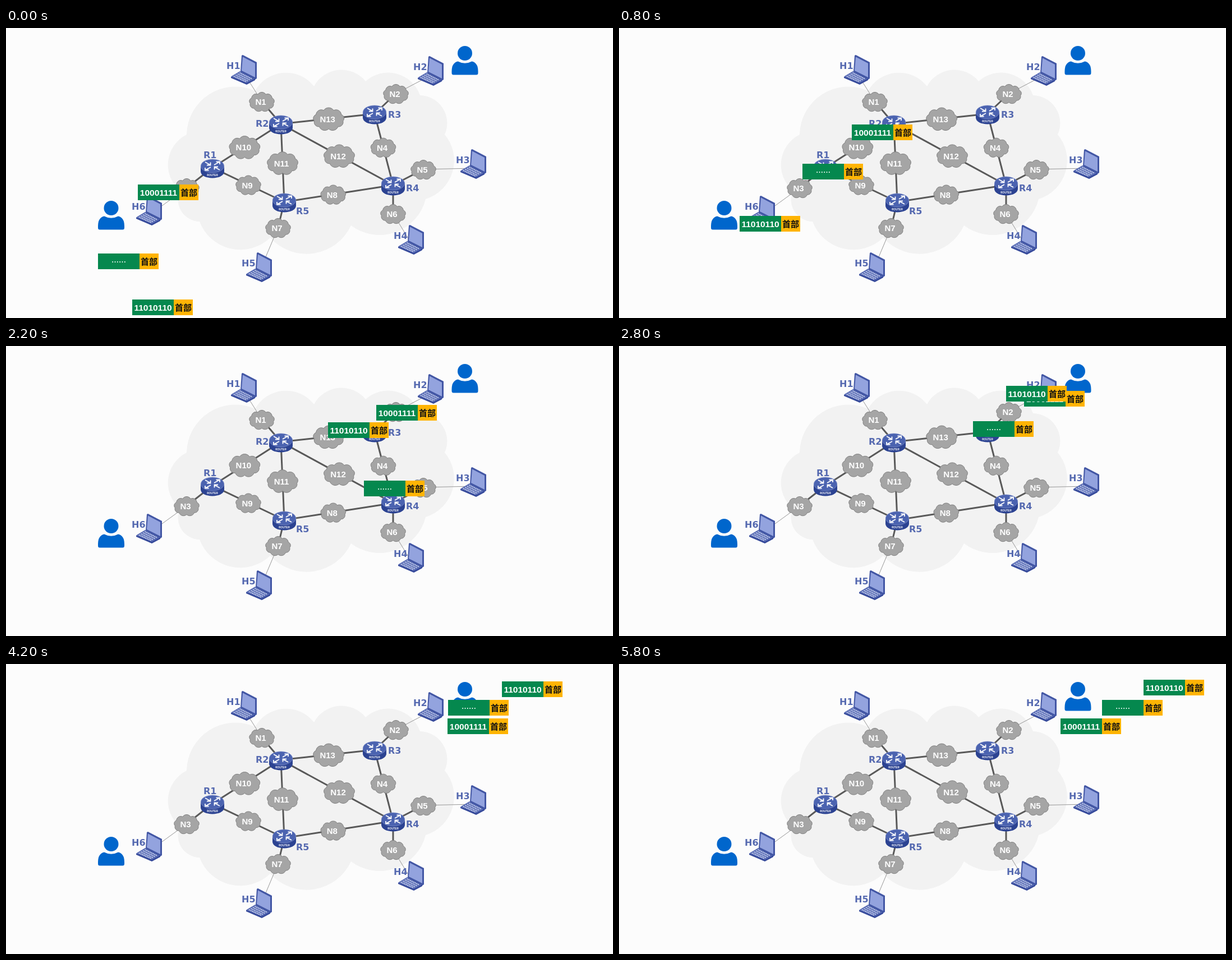
These frames come from a looping animation (1082 by 517 pixels, 6000 ms). An HTML page:

```html
<!DOCTYPE html>
<html lang="zh-CN">
<head>
<meta charset="utf-8">
<style>
html, body { margin: 0; width: 100%; height: 100%; overflow: hidden; background: #fcfcfc; }
svg { display: block; width: 1082px; height: 517px; }
.label { font: bold 16px "DejaVu Sans", sans-serif; fill: #5569b0; }
.net, .bits, .head, .tag { fill: #fff; text-anchor: middle; }
.net { font: bold 15px "Liberation Sans", sans-serif; }
.bits { font: bold 15.5px "Liberation Sans", "Noto Sans CJK SC", sans-serif; }
.dots { font: bold 13px "Noto Sans CJK SC", "Noto Sans CJK", sans-serif; }
.head { font: bold 15px "Noto Sans CJK SC", "Noto Sans CJK", sans-serif; fill: #111; }
.tag { font: bold 4.6px "Liberation Sans", sans-serif; }
</style>
</head>
<body>
<svg id="stage" viewBox="0 0 1082 517">
  <defs>
    <g id="person" fill="#0066cc">
      <circle cx="23.5" cy="13" r="13"/>
      <path d="M0 45Q0 30 11 27.500Q23.500 34 36 27.500Q47 30 47 45V48Q47 51.500 44 51.500H3Q0 51.500 0 48Z"/>
    </g>
    <g id="laptop" stroke-linejoin="round">
      <path d="M0 39V41L28 53L43 45V42Z" fill="#35499a"/>
      <path d="M16 29L43 42L28 50L0 38.500Z" fill="#5a6db5"/>
      <path d="M15.500 32L37 42.500M12 34L33.500 44.500M8.500 36L30 46.500M5 38L27 48" stroke="#dfe5f8" stroke-width="1.700" stroke-dasharray="1.900 1.200"/>
      <path d="M19 1L21 0L46 13V42L43 44L17 30Z" fill="#4256a4"/>
      <path d="M21 3.500L43 15V40L19 28Z" fill="#93a3de"/>
    </g>
    <g id="router">
      <path d="M-21-4V6A21 11.500 0 0 0 21 6V-4Z" fill="#2c4392"/>
      <ellipse cy="-4" rx="20.700" ry="12" fill="#4b63b0" stroke="#8494cc" stroke-width=".7"/>
      <g fill="none" stroke="#fff" stroke-width="1.800">
        <path id="arrows" d="M3-6L12-11M6.500-11.500H13V-7M-13-11L-4-6M-3.500-10.500V-5.500H-10"/>
        <use href="#arrows" transform="rotate(180 0 -4)"/>
      </g>
      <text class="tag" y="14">ROUTER</text>
    </g>
  </defs>
</svg>
<script>
const stage = document.getElementById("stage");

// x, y, then the label's offset
const routers = {
  R1: [368, 250, -16, -18], R2: [490, 172, -45, 4], R3: [657, 154, 24, 6],
  R4: [690, 281, 23, 10], R5: [496, 311, 21, 21]
};
const hosts = { H1: [401, 48], H2: [734, 50], H3: [810, 216], H4: [699, 351], H5: [428, 400], H6: [232, 299] };

// Nets between two routers sit part of the way along the link; the others join a router and a host.
const core = {
  N4: ["R3", "R4", .47], N8: ["R5", "R4", .45], N9: ["R1", "R5", .5], N10: ["R1", "R2", .47],
  N11: ["R2", "R5", .5], N12: ["R2", "R4", .52], N13: ["R2", "R3", .51]
};
const access = {
  N1: ["R2", "H1", 456, 132], N2: ["R3", "H2", 695, 118], N3: ["R1", "H6", 322, 286],
  N5: ["R4", "H3", 744, 253], N6: ["R4", "H4", 690, 332], N7: ["R5", "H5", 485, 357]
};

// Each packet follows its route with steadily falling speed.
const packets = [
  { text: "10001111", start: 0, end: 4200,
    route: [[289, 293], "R1", "R2", "R3", [762, 90], [841, 111]] },
  { text: "……", start: 0, end: 5800,
    route: [[218, 416], [256, 325], "R1", "R5", [695, 268], [672, 160], [762, 77], [915, 78]] },
  { text: "11010110", start: 400, end: 5340,
    route: [[279, 498], [268, 340], [368, 262], [490, 184], [655, 143], [790, 55], [989, 42]] }
];

const mix = ([x1, y1], [x2, y2], k) => [x1 + (x2 - x1) * k, y1 + (y2 - y1) * k];
const distance = ([x1, y1], [x2, y2]) => Math.hypot(x2 - x1, y2 - y1);

const line = ([x1, y1], [x2, y2], color, width) =>
  `<path d="M${x1} ${y1 - 1}L${x2} ${y2 - 1}" stroke="${color}" stroke-width="${width}"/>`;
const thick = (a, b) => line(a, b, "#595959", 3);
const thin = (a, b) => line(a, b, "#969696", 1);

// Closed outline with one round bump between each pair of points
function bumps(points, style) {
  const arcs = points.map((p, i) => {
    const q = points[(i + 1) % points.length], r = distance(p, q) * .6;
    return `A${r} ${r} 0 0 1 ${q}`;
  });
  return `<path d="M${points[0]}${arcs.join("")}Z" ${style}/>`;
}

function net(name, [x, y]) {
  const big = name.length > 2, rx = big ? 26 : 21, ry = big ? 17 : 14.5;
  const rim = Array.from({ length: 9 }, (_, i) => {
    const a = (i + .25) / 9 * 2 * Math.PI;
    return [x + rx * Math.cos(a), y + ry * Math.sin(a)];
  });
  return bumps(rim, 'fill="#a5a5a5" stroke="#7f7f7f"') +
    `<text class="net" x="${x - 2}" y="${y + 5}">${name}</text>`;
}

const use = (id, x, y) => `<use href="#${id}" x="${x}" y="${y}"/>`;
const label = (name, x, y) => `<text class="label" x="${x}" y="${y}">${name}</text>`;

function packet({ text }) {
  const kind = text === "……" ? "bits dots" : "bits";
  return `<g class="packet">
    <rect x="-54" y="-14" width="74" height="28" fill="#05884e"/>
    <rect x="20" y="-14" width="34" height="28" fill="#ffb404"/>
    <text class="${kind}" x="-17" y="5.5">${text}</text>
    <text class="head" x="37" y="6">首部</text></g>`;
}

const links = [], clouds = [];
for (const [name, [a, b, k]] of Object.entries(core)) {
  links.push(thick(routers[a], routers[b]));
  clouds.push(net(name, mix(routers[a], routers[b], k)));
}
for (const [name, [r, h, x, y]] of Object.entries(access)) {
  const [hx, hy] = hosts[h];
  links.push(thin([x, y], [hx + 24, hy + 35]), thick(routers[r], [x, y]));
  clouds.push(net(name, [x, y]));
}

stage.insertAdjacentHTML("beforeend", [
  bumps([[322, 190], [444, 112], [549, 104], [641, 95], [738, 120], [782, 190],
    [748, 305], [615, 352], [471, 374], [345, 345], [310, 290]], 'fill="#f2f2f2"'),
  ...links, ...clouds,
  ...Object.entries(routers).map(([s, [x, y, dx, dy]]) => use("router", x, y) + label(s, x + dx, y + dy)),
  ...Object.entries(hosts).map(([s, [x, y]]) => use("laptop", x, y) + label(s, x - 8, y + 25)),
  use("person", 794.5, 32), use("person", 164, 308),
  ...packets.map(packet)
].join(""));

const groups = stage.querySelectorAll(".packet");

function place({ start, end, route }, time) {
  const points = route.map(p => routers[p] || p);
  const steps = points.slice(1).map((p, i) => distance(points[i], p));
  const u = Math.min(Math.max((time - start) / (end - start), 0), 1);
  let left = steps.reduce((a, b) => a + b) * (1 - (1 - u) ** 2);
  let i = 0;
  while (i < steps.length - 1 && left > steps[i]) left -= steps[i++];
  return mix(points[i], points[i + 1], left / steps[i]);
}

function draw(now) {
  const time = Math.floor(now % 6000 / 200) * 200;
  packets.forEach((p, i) => {
    const [x, y] = place(p, time).map(Math.round);
    groups[i].setAttribute("transform", `translate(${x} ${y})`);
  });
  requestAnimationFrame(draw);
}
requestAnimationFrame(draw);
</script>
</body>
</html>
```
